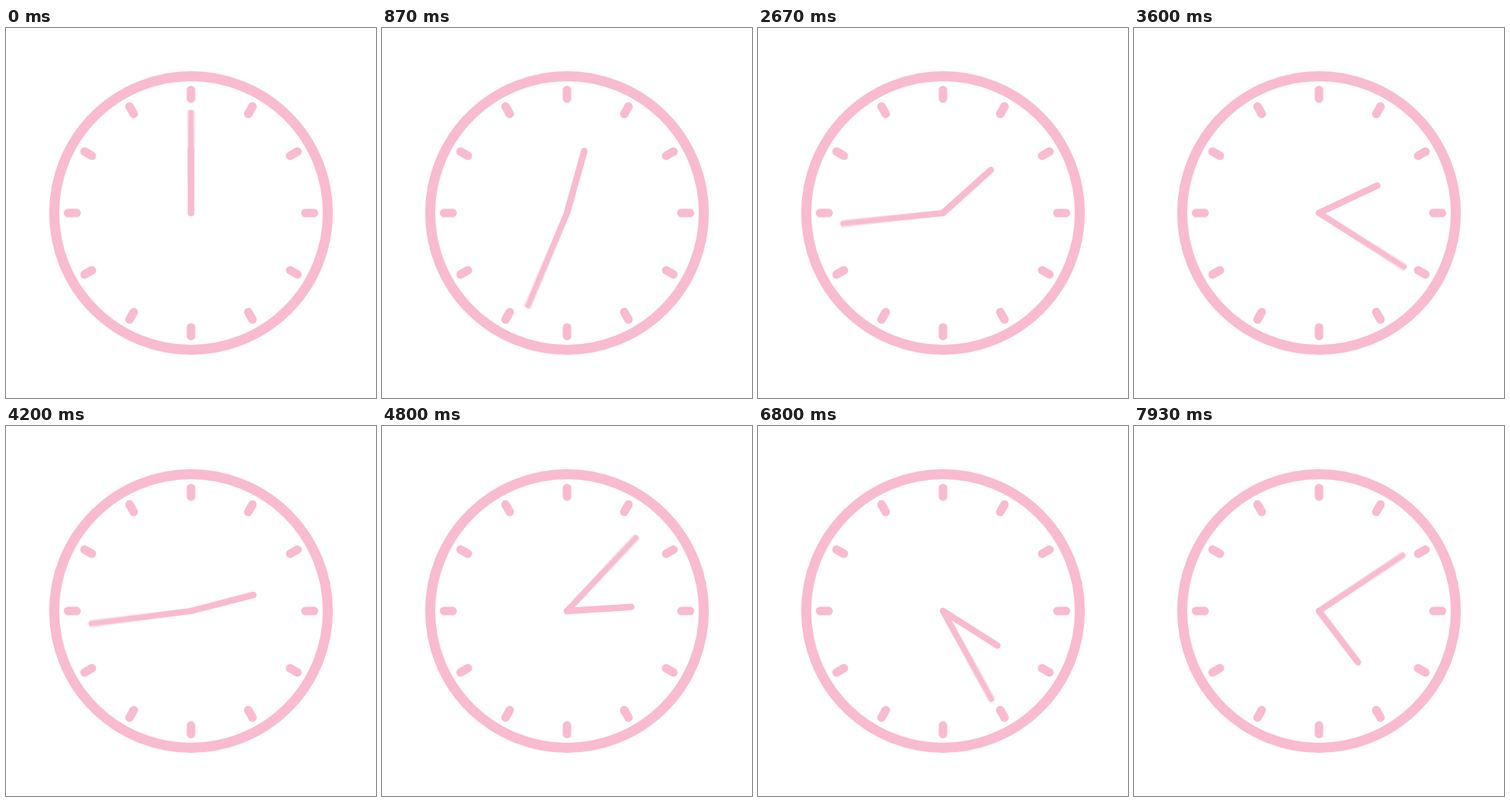
These frames come from a looping animation (480x480 px, 8 s). An HTML page with a canvas:

```html
<!DOCTYPE html>
<html lang="en">
<head>
<meta charset="utf-8">
<title>Clock</title>
<style>
  html, body { margin: 0; width: 100%; height: 100%; overflow: hidden; background: #fff; }
  canvas { display: block; width: 100vmin; height: 100vmin; }
</style>
</head>
<body>
<canvas id="clock" width="480" height="480"></canvas>
<script>
const ctx = document.getElementById('clock').getContext('2d');
const LOOP = 8000;
const FRAME = 1000 / 15;
const HOUR_SPEED = 0.018;              // degrees per ms
const MINUTE_SPEED = HOUR_SPEED * 13;
const BLUR = 1.2;                      // sweep of the minute hand's blur, in degrees
const BLUR_SAMPLES = 4;

// Line along a clock angle, from one radius to another.
function spoke(degrees, from, to, width) {
  const a = degrees * Math.PI / 180;
  const x = Math.sin(a), y = -Math.cos(a);
  ctx.lineWidth = width;
  ctx.beginPath();
  ctx.moveTo(x * from, y * from);
  ctx.lineTo(x * to, y * to);
  ctx.stroke();
}

function drawMinuteHand(degrees) {
  // Additive samples average to a solid core with soft edges.
  ctx.globalCompositeOperation = 'lighter';
  ctx.globalAlpha = 1 / BLUR_SAMPLES;
  for (let i = 0; i < BLUR_SAMPLES; i++) {
    spoke(degrees + BLUR * (i / (BLUR_SAMPLES - 1) - 0.5), 0, 130, 8);
  }
  ctx.globalCompositeOperation = 'source-over';
  ctx.globalAlpha = 1;
}

function drawFace() {
  ctx.lineWidth = 13;
  ctx.beginPath();
  ctx.arc(0, 0, 177.5, 0, Math.PI * 2);
  ctx.stroke();
  for (let hour = 0; hour < 12; hour++) spoke(hour * 30, 148.5, 159.5, 11);
}

function draw(time) {
  ctx.setTransform(1, 0, 0, 1, 0, 0);
  ctx.clearRect(0, 0, 480, 480);
  ctx.translate(240, 240);
  ctx.strokeStyle = '#f8bbd0';
  ctx.lineCap = 'round';
  drawMinuteHand(time * MINUTE_SPEED);
  spoke(time * HOUR_SPEED, 0, 83.5, 8.5);
  drawFace();
}

const start = performance.now();

function tick() {
  const elapsed = (performance.now() - start) % LOOP;
  // Frames change on the nearest 10 ms, hence the small lead.
  const step = Math.floor((elapsed + 3.4) / FRAME) % 120;
  draw(step * FRAME);
  requestAnimationFrame(tick);
}
tick();
</script>
</body>
</html>
```
